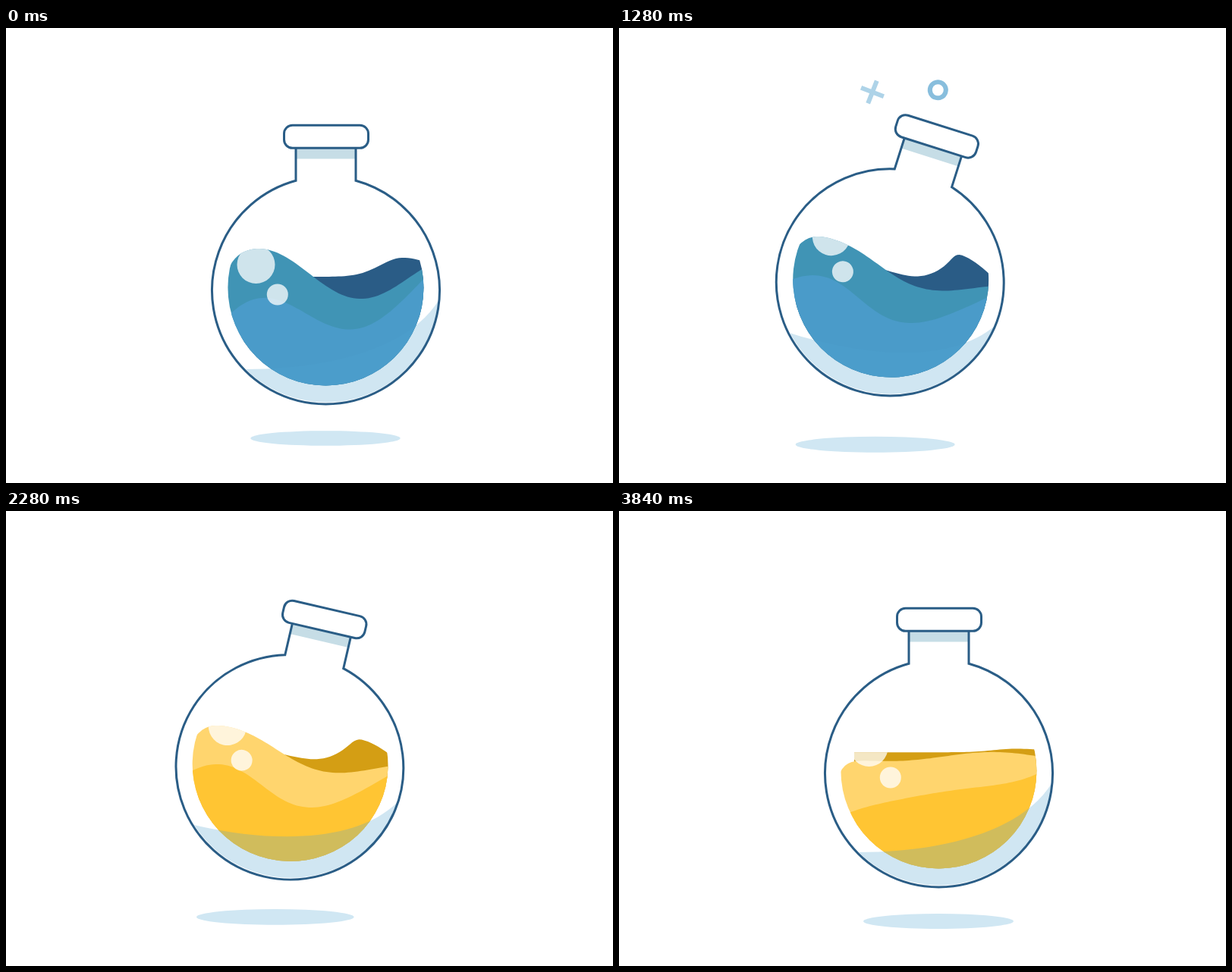
These frames come from a looping animation (800 by 600 pixels, 3880 ms). An HTML page:

```html
<!DOCTYPE html>
<html lang="en">
<head>
<meta charset="utf-8">
<title>Swinging flask</title>
<style>
  html, body { margin: 0; width: 100%; height: 100%; overflow: hidden; background: #fff; }
  svg { display: block; width: 800px; height: 600px; }
  .glass { fill: none; stroke: #2a5d86; stroke-width: 3; }
  #rays { stroke: #d0e7f2; stroke-width: 6; stroke-linecap: round; }
  #symbols { fill: none; stroke: #88bedd; stroke-width: 6; }
</style>
</head>
<body>
<svg viewBox="0 0 800 600">
  <defs>
    <clipPath id="bowl"><circle cx="421.4" cy="342.5" r="129"/></clipPath>
    <clipPath id="wet"><use href="#back"/><use href="#front"/></clipPath>
  </defs>
  <ellipse id="shadow" fill="#d0e7f3"/>
  <g id="rays"></g>
  <g id="symbols"></g>
  <g id="flask">
    <g clip-path="url(#bowl)">
      <path id="back"/>
      <path id="front"/>
      <path id="deep"/>
      <g fill="#fff" fill-opacity=".75" clip-path="url(#wet)">
        <circle cx="329.5" cy="312" r="25"/>
        <circle cx="357.8" cy="351.5" r="14"/>
      </g>
    </g>
    <path d="M316 450C420 450 530 425 571 358A150 150 0 0 1 316 450" fill="#4ea1ce" fill-opacity=".265"/>
    <path d="M382 159H461V172.5H382Z" fill="#c6dde6"/>
    <path class="glass" d="M382 159V201.3A150 150 0 1 0 461 201.3V159"/>
    <rect class="glass" x="366.5" y="128.3" width="111" height="30" rx="11"/>
  </g>
</svg>
<script>
const LOOP = 3880, STEP = 40, TAU = 2 * Math.PI;
const $ = id => document.getElementById(id);
const clamp = v => Math.max(0, Math.min(1, v));
const mix = (a, b, k) => a + (b - a) * k;
const lastBefore = (starts, t) => starts.filter(s => s <= t).pop() ?? t;

function set(el, attrs) {
  for (const k in attrs) el.setAttribute(k, attrs[k]);
  return el;
}
function add(parent, tag, attrs = {}) {
  const el = document.createElementNS('http://www.w3.org/2000/svg', tag);
  parent.append(el);
  return set(el, attrs);
}

// Cosine easing between turning points [time, value]
function sway(turns, t) {
  const i = Math.max(1, turns.findIndex(k => k[0] > t));
  const [a, b] = [turns[i - 1], turns[i]];
  const p = clamp((t - a[0]) / (b[0] - a[0]));
  return mix(a[1], b[1], (1 - Math.cos(Math.PI * p)) / 2);
}
const tilt = [[0, 0], [600, 24.5], [1205, -19.2], [1820, 24.5], [2440, -20],
  [3060, 12.5], [3545, -11.6], [3690, 4.3], [3840, 0], [LOOP, 0]];
const drift = [[0, 0], [560, 90], [1190, -95], [1770, 105], [2465, -100],
  [3070, 48], [3530, -46], [3690, 16], [3840, 0], [LOOP, 0]];

// How much the flask is flattened, 0 to 0.1
const squash = t => t < 0 || t > 2420 ? 0 : .05 * (1 - Math.cos(TAU * t / 1210));

function drawFlask(t) {
  set($('flask'), {
    transform: `translate(421.5 133) rotate(${-sway(tilt, t)}) scale(1 ${1 - squash(t)}) translate(-421.5 -133)`
  });
  const x = sway(drift, t), spread = Math.abs(x) / 10;
  const r = 99 + spread - 290 * squash(t + 40);
  set($('shadow'), { cx: 421 + x, cy: 541 + spread - 520 * squash(t - 55), rx: r, ry: r / 10 });
}

const tints = {
  back: [[42, 92, 134], [212, 158, 20]],
  front: [[64, 148, 181], [255, 213, 110]],
  deep: [[74, 155, 201], [255, 197, 51]]
};

function drawLiquid(t) {
  const p = t / 1040 % 1;
  const swell = Math.sin(Math.PI * p) ** 2;
  const energy = 1 - .67 * clamp((t - 2680) / 1160), surge = energy ** 4;

  // The crest travels left by one wavelength per cycle, gathering speed
  const crest = 595 - 260 * p ** 2.3;
  const wave = (x, shift) => Math.cos(TAU * (x - crest - shift) / 260);
  const surface = (x, u) => 325 + energy * ((6 - 18 * swell) * u -
    (15 + 15 * (2 * p - 1) ** 8 + 10 * swell * u) * wave(x, 0)) + 16 * Math.max(0, -u) ** 14;
  const inner = (x, u) => 373 - 25 * u ** 3 - energy * (12 * swell * u +
    (25 - 10 * swell) * wave(x, -10));

  // The far edge is a bump whose top leans left and curls over
  const top = 523 - 13 * swell * surge;
  const far = x => {
    const bump = Math.exp(-(((x - top) / (x < top ? 42 : 60)) ** 2));
    return [x - 38 * swell * surge * bump ** 3,
      318 + (10 + 10 * swell) * surge - (4 + (21 + 55 * swell) * surge) * bump];
  };

  const trace = (from, point) => {
    const pts = [];
    for (let x = from; x <= 570; x += 4) pts.push(point(x).map(v => v.toFixed(2)));
    return `M${pts.join('L')}V480H${from}Z`;
  };
  const level = f => x => [x, f(x, (x - 421) / 129)];
  set($('front'), { d: trace(290, level(surface)) });
  set($('deep'), { d: trace(290, level(inner)) });
  set($('back'), { d: trace(310, far) });

  const k = clamp((t - 1400) / 380);
  for (const id in tints) {
    const [a, b] = tints[id];
    set($(id), { fill: `rgb(${a.map((c, i) => Math.round(mix(c, b[i], k)))})` });
  }
}

// Fans of three rays
const fans = [
  { x: 378, y: 132, r: 48, grow: 7, angle: 243, turn: -27, wait: 80 },
  { x: 507, y: 256, r: 45, grow: -1.5, angle: -78, turn: 23.5, wait: 0 }
];
for (const fan of fans) fan.lines = [0, 1, 2].map(() => add($('rays'), 'line'));
const bursts = [80, 3120];

function drawRays(t) {
  for (const f of fans) {
    const p = (t - lastBefore(bursts, t) - f.wait) / 420;
    const far = 44 * (1 - (1 - p) ** 2), near = 44 * p ** 3;
    f.lines.forEach((line, i) => {
      const a = (f.angle + f.turn * i) * TAU / 360, r = f.r + f.grow * i;
      const along = d => [f.x + (r + d) * Math.cos(a), f.y + (r + d) * Math.sin(a)];
      const [x1, y1] = along(near), [x2, y2] = along(far);
      set(line, { x1, y1, x2, y2, visibility: p > 0 && p < 1 ? 'visible' : 'hidden' });
    });
  }
}

const symbols = [
  {
    from: [396, 135], move: [-70, -57], starts: [856, 1600, 2360],
    el: add($('symbols'), 'path', { d: 'M-16 0H16M0-16V16' })
  },
  {
    from: [435, 144], move: [-19.6, -83], starts: [960, 1600, 2470],
    el: add($('symbols'), 'circle', { r: 10.5 })
  }
];

function drawSymbols(t) {
  for (const { from, move, starts, el } of symbols) {
    const age = t - lastBefore(starts, t);
    const p = clamp(age / 640), e = 1 - (1 - p) ** 2;
    set(el, {
      transform: `translate(${from.map((v, i) => v + move[i] * e)}) rotate(${24 * e})`,
      opacity: Math.min(clamp(age / 220), clamp(2 - 2 * p))
    });
  }
}

const begin = performance.now();
function tick() {
  const now = (performance.now() - begin) % LOOP;
  const t = Math.floor(now / STEP) * STEP;
  drawFlask(t);
  drawLiquid(t);
  drawRays(t);
  drawSymbols(t);
  requestAnimationFrame(tick);
}
tick();
</script>
</body>
</html>
```
